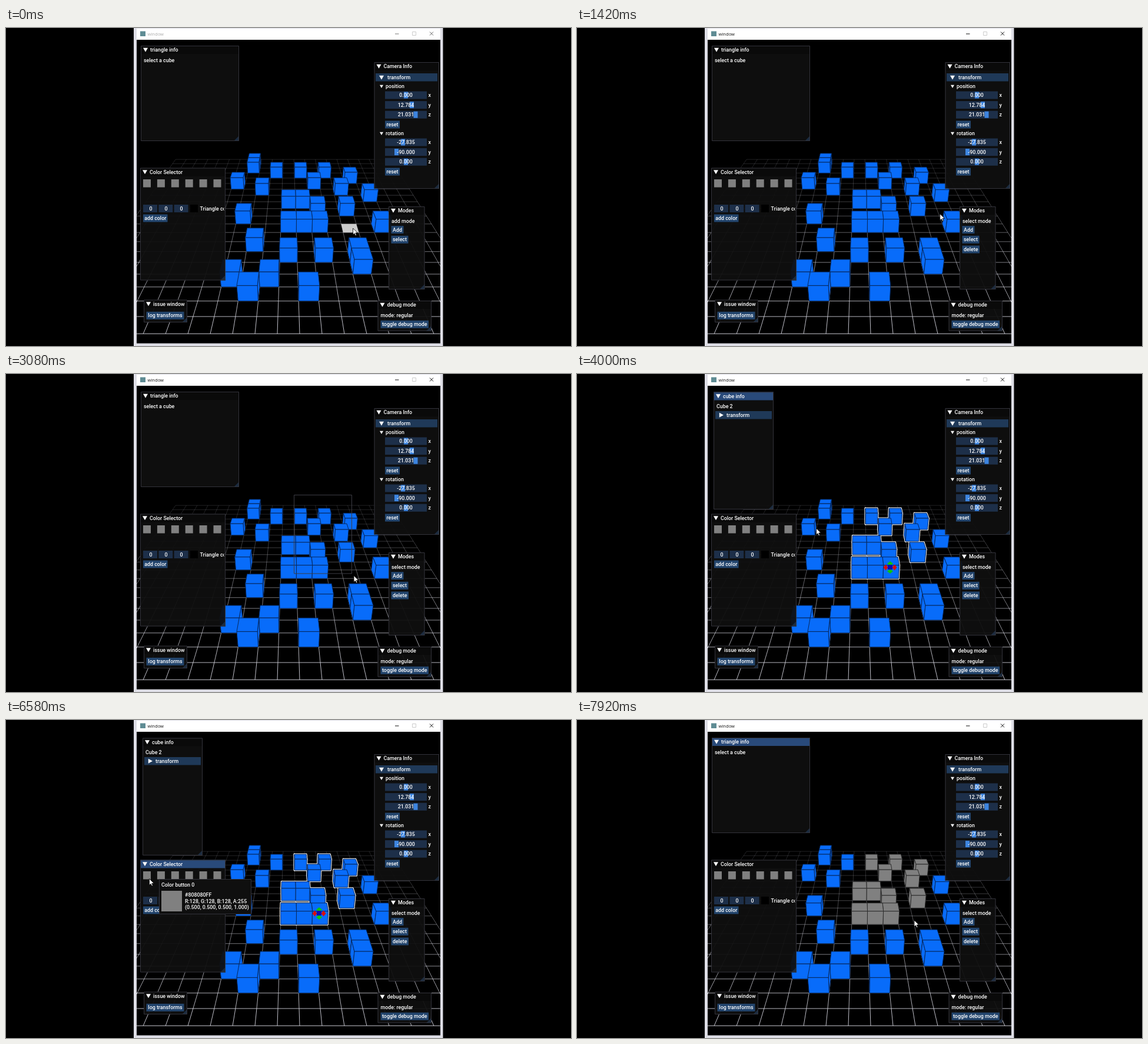
These frames come from a looping animation (960 px wide and 540 px high, 8000 ms). An HTML page with a canvas:

```html
<!DOCTYPE html>
<html lang="en">
<head>
<meta charset="utf-8">
<title>Cube editor</title>
<style>
html, body { margin: 0; width: 100%; height: 100%; overflow: hidden; background: #000; }
canvas { display: block; width: 960px; height: 540px; }
</style>
</head>
<body>
<canvas id="stage" width="960" height="540"></canvas>
<script>
const g = document.getElementById('stage').getContext('2d');
const LOOP = 8000;
const UI_FONT = '500 8.85px Roboto, sans-serif';
const C = {
  text: '#fff', panel: 'rgba(15,15,15,.94)', border: '#33333b', title: '#0a0a0a',
  active: '#294a7a', button: '#23456d', header: '#1f3958', frame: '#1d2f49', grab: '#3d85e0',
  swatch: '#808080', grip: '#1c2c40',
  blue: '#086cfa', blueEdge: '#06285e', grey: '#808080', greyEdge: '#2c2c2c'
};

// Moments at which the state changes
const SELECT_MODE = 900, DRAG = 2330, SELECTED = 3300, COLOR_FOCUS = 6480, PAINTED = 6680, DESELECTED = 7640;

// Cursor path: time, x, y
const PATH = [
  [0, 589.5, 340], [120, 589.5, 340], [500, 665, 367.5], [760, 668, 360], [1050, 668, 360],
  [2100, 489, 205], [2330, 489, 205], [2420, 501.5, 213.5], [3200, 597, 351], [3420, 597, 351],
  [4000, 406.5, 262], [4400, 406.5, 262], [5580, 528.5, 360], [5850, 528.5, 360],
  [6380, 243.5, 269.5], [6740, 243.5, 269.5], [7480, 573, 340], [LOOP, 573, 340]
];

function cursorAt(t) {
  let i = 1;
  while (PATH[i][0] < t) i++;
  const [t0, x0, y0] = PATH[i - 1], [t1, x1, y1] = PATH[i];
  const k = (t - t0) / (t1 - t0), e = k * k * (3 - 2 * k);
  return [x0 + (x1 - x0) * e, y0 + (y1 - y0) * e];
}

// Perspective camera
const CAM_Y = 12.784, CAM_Z = 21.031, PITCH = 27.835 * Math.PI / 180;
const SIN = Math.sin(PITCH), COS = Math.cos(PITCH), FOCAL = 258 / Math.tan(Math.PI / 8);
const MID_X = 480, MID_Y = 277.5, FLOOR = -.5;

function project(x, y, z) {
  const h = y - CAM_Y, d = CAM_Z - z, depth = COS * d - SIN * h;
  return [MID_X + FOCAL * x / depth, MID_Y - FOCAL * (COS * h + SIN * d) / depth];
}

function cellUnder(sx, sy) {
  const r = (MID_Y - sy) / FOCAL, h = CAM_Y - FLOOR;
  const d = h * (COS + SIN * r) / (SIN - COS * r);
  return [Math.round((sx - MID_X) / FOCAL * (COS * d + SIN * h)), Math.round(CAM_Z - d)];
}

// Cubes by row: z, then x positions; farthest first
const rows = (...list) => list.flatMap(([z, ...xs]) => xs.map(x => [x, z]));
const PLAIN = rows([-9, -3], [-8, -3], [-7, -1], [-5, -4], [-4, -2], [-3, 6], [0, -3], [1, 6],
  [3, -2], [4, 4, 2, 0], [5, 4], [6, -3, -1], [7, -2, 1]);
const PICKED = rows([-7, 3, 1], [-6, 5], [-5, 2], [-4, 4], [-2, 1, 0], [-1, 4, 2], [1, 2, 1, 0]);

function polygon(points, fill, stroke, width = 1) {
  g.beginPath();
  points.forEach(p => g.lineTo(...p));
  g.closePath();
  if (fill) { g.fillStyle = fill; g.fill(); }
  if (stroke) { g.strokeStyle = stroke; g.lineWidth = width; g.lineJoin = 'round'; g.stroke(); }
}

function cubeFaces([x, z]) {
  const at = (i, j, k) => project(x + i / 2, j / 2, z + k / 2);
  const s = -Math.sign(x);
  const faces = [
    [at(-1, 1, -1), at(1, 1, -1), at(1, 1, 1), at(-1, 1, 1)],
    [at(-1, 1, 1), at(1, 1, 1), at(1, -1, 1), at(-1, -1, 1)]
  ];
  if (s) faces.unshift([at(s, 1, -1), at(s, 1, 1), at(s, -1, 1), at(s, -1, -1)]);
  return faces;
}

function drawCubes(cubes, fill, edge) {
  cubes.flatMap(cubeFaces).forEach(f => polygon(f, fill, edge));
}

function drawGrid() {
  g.lineWidth = 1;
  const line = (a, b, z) => {
    const near = (z + 10.5) / 20;
    g.strokeStyle = `rgba(222,222,232,${.15 + .75 * near * near})`;
    g.beginPath(); g.moveTo(...a); g.lineTo(...b); g.stroke();
  };
  for (let i = 0; i <= 20; i++) {
    const p = i - 10.5;
    line(project(-10.5, FLOOR, p), project(9.5, FLOOR, p), p);
    for (let z = -10.5; z < 9.5; z++) line(project(p, FLOOR, z), project(p, FLOOR, z + 1), z + .5);
  }
}

function drawGizmo(x, y) {
  const diamond = (cx, cy, w, h, color) =>
    polygon([[cx - w, cy], [cx, cy - h], [cx + w, cy], [cx, cy + h]], color);
  diamond(x, y - 6, 5, 4, '#0cc40c');
  diamond(x, y + 7, 5, 4, '#0cc40c');
  diamond(x - 7.5, y + .5, 4, 5, '#d80c0c');
  diamond(x + 7.5, y + .5, 4, 5, '#d80c0c');
  rect(x - 4, y - 4, 8, 8, '#0c0cb0');
}

function drawScene(t, cx, cy) {
  g.save();
  g.beginPath(); g.rect(222, 20, 516, 515); g.clip();
  drawGrid();
  if (t < SELECT_MODE && cx < 650) {
    const [x, z] = cellUnder(cx, cy);
    polygon([[-.5, -.5], [.5, -.5], [.5, .5], [-.5, .5]].map(([i, k]) => project(x + i, FLOOR, z + k)), '#ccc');
  }
  const selected = t >= SELECTED && t < DESELECTED, painted = t >= PAINTED;
  drawCubes(PLAIN, C.blue, C.blueEdge);
  if (selected) PICKED.flatMap(cubeFaces).forEach(f => polygon(f, null, '#fff', 3));
  drawCubes(PICKED, painted ? C.grey : C.blue, painted ? C.greyEdge : C.blueEdge);
  if (selected) drawGizmo(532, 328);
  if (t >= DRAG && t < SELECTED) {
    g.strokeStyle = '#3c3c44';
    g.lineWidth = 1;
    g.strokeRect(489.5, 205.5, Math.max(0, cx - 493), Math.max(0, cy - 209));
  }
  g.restore();
}

// Interface pieces
function rect(x, y, w, h, color) { g.fillStyle = color; g.fillRect(x, y, w, h); }

// y is the vertical middle of the line
function text(s, x, y, align = 'left') {
  g.font = UI_FONT; g.textAlign = align; g.fillStyle = C.text;
  g.fillText(s, x, y + 3);
}

function arrow(x, y, r = 4, right = false) {
  polygon(right ? [[x - r * .8, y - r], [x + r, y], [x - r * .8, y + r]]
                : [[x - r, y - r * .75], [x + r, y - r * .75], [x, y + r]], C.text);
}

function panel(name, x, y, w, h, active) {
  rect(x, y, w, h, C.panel);
  rect(x, y, w, 14, active ? C.active : C.title);
  polygon([[x + w, y + h - 9], [x + w, y + h], [x + w - 9, y + h]], C.grip);
  g.strokeStyle = C.border; g.lineWidth = 1;
  g.strokeRect(x + .5, y + .5, w - 1, h - 1);
  arrow(x + 8, y + 6.8);
  text(name, x + 16, y + 7);
}

function button(label, x, y, w) {
  rect(x, y - 6.5, w, 13, C.button);
  text(label, x + w / 2, y, 'center');
}

function sliders(name, y, values, grabs) {
  arrow(638, y, 3);
  text(name, 645, y);
  values.forEach((v, i) => {
    const row = y + 15 + i * 16.6;
    rect(644, row - 6.5, 71, 13, C.frame);
    rect(grabs[i], row - 5.5, 7, 11, C.grab);
    text(v, 679.5, row, 'center');
    text('xyz'[i], 717.5, row);
  });
  button('reset', 644, y + 65, 25);
}

function drawPanels(t) {
  if (t >= SELECTED && t < DESELECTED) {
    panel('cube info', 232, 30.5, 102, 199.5, t < COLOR_FOCUS);
    text('Cube 2', 237, 55);
    rect(235, 63, 96, 13.5, C.header);
    arrow(245, 69.8, 4, true);
    text('transform', 254, 70);
  } else {
    panel('triangle info', 229, 30, 167, 162, t >= DESELECTED);
    text('select a cube', 234, 54.5);
  }

  panel('Camera Info', 625.5, 58, 110.5, 215);
  rect(628, 77, 105, 13.5, C.header);
  arrow(638, 83.8);
  text('transform', 648, 84);
  sliders('position', 99, ['0.000', '12.784', '21.031'], [676, 686, 692.5]);
  sliders('rotation', 179, ['-27.835', '-90.000', '0.000'], [671, 660, 676]);

  panel('Color Selector', 228, 237.5, 145, 191, t >= COLOR_FOCUS && t < DESELECTED);
  for (let i = 0; i < 6; i++) rect(233 + i * 23.9, 257, 13, 13.5, C.swatch);
  for (let i = 0; i < 3; i++) {
    rect(233 + i * 26.3, 300, 24, 13, C.frame);
    text('0', 246 + i * 26, 306.5, 'center');
  }
  rect(313, 300, 13, 13, '#000');
  g.save();
  g.beginPath(); g.rect(228, 295, 142.5, 25); g.clip();
  text('Triangle color', 329.5, 306.5);
  g.restore();
  button('add color', 233, 323, 41.5);

  panel('Modes', 650, 303, 61.5, 141);
  text(t < SELECT_MODE ? 'add mode' : 'select mode', 655, 327.5);
  button('Add', 654.5, 342.5, 21);
  button('select', 654.5, 359.3, 29);
  if (t >= SELECT_MODE) button('delete', 654.5, 376, 29.5);

  panel('issue window', 234, 461.5, 74, 38.5);
  button('log transforms', 238.5, 488.3, 64);

  panel('debug mode', 631.5, 463, 91.5, 51.5);
  text('mode: regular', 636.5, 488.3);
  button('toggle debug mode', 636.5, 503.2, 81.5);
}

function drawTooltip(cx, cy) {
  const index = Math.floor((cx - 233) / 23.9), inside = cx - 233 - index * 23.9 < 13;
  if (index < 0 || index > 5 || !inside || cy < 257 || cy > 270.5) return;
  const x = cx + 16.5, y = cy + .5;
  rect(x, y, 157, 60, '#0f0f0f');
  g.strokeStyle = C.border; g.lineWidth = 1;
  g.strokeRect(x + .5, y + .5, 156, 59);
  text('Color button ' + index, x + 4, y + 10);
  rect(x + 4, y + 20, 35, 35, C.swatch);
  ['#808080FF', 'R:128, G:128, B:128, A:255', '(0.500, 0.500, 0.500, 1.000)']
    .forEach((s, i) => text(s, x + 44, y + 27.3 + i * 10.4));
}

function drawWindowFrame(focused) {
  rect(0, 0, 960, 540, '#000');
  rect(217, 0, 525.5, 540, '#dedee6');
  rect(222, 1, 516, 19, '#fff');
  rect(222, 20, 516, 515.5, '#000');
  rect(228, 5.5, 9, 8.5, '#5f8c94');
  const ink = focused ? '#111' : '#aaa';
  g.font = '7.6px "Open Sans", sans-serif';
  g.textAlign = 'left'; g.fillStyle = ink;
  g.fillText('window', 240.5, 12.8);
  rect(661, 9.5, 6.5, 1, focused ? '#111' : '#777');
  g.lineWidth = 1;
  g.strokeStyle = '#ccc';
  g.strokeRect(690.5, 6.5, 6, 6);
  g.strokeStyle = focused ? '#111' : '#666';
  g.beginPath();
  g.moveTo(720, 6.5); g.lineTo(726, 12.5);
  g.moveTo(726, 6.5); g.lineTo(720, 12.5);
  g.stroke();
}

function drawCursor(x, y) {
  const shape = [[0, 0], [0, 11], [2.5, 8.7], [4.2, 12.5], [6, 11.7], [4.3, 8], [7.8, 7.8]];
  polygon(shape.map(([i, j]) => [x + i, y + j]), '#fff', '#000', .8);
}

function draw(now) {
  const t = now % LOOP, [cx, cy] = cursorAt(t);
  drawWindowFrame(t >= SELECT_MODE);
  drawScene(t, cx, cy);
  drawPanels(t);
  drawTooltip(cx, cy);
  drawCursor(cx, cy);
}

const start = performance.now();
function tick() {
  draw(performance.now() - start);
  requestAnimationFrame(tick);
}
tick();
</script>
</body>
</html>
```
